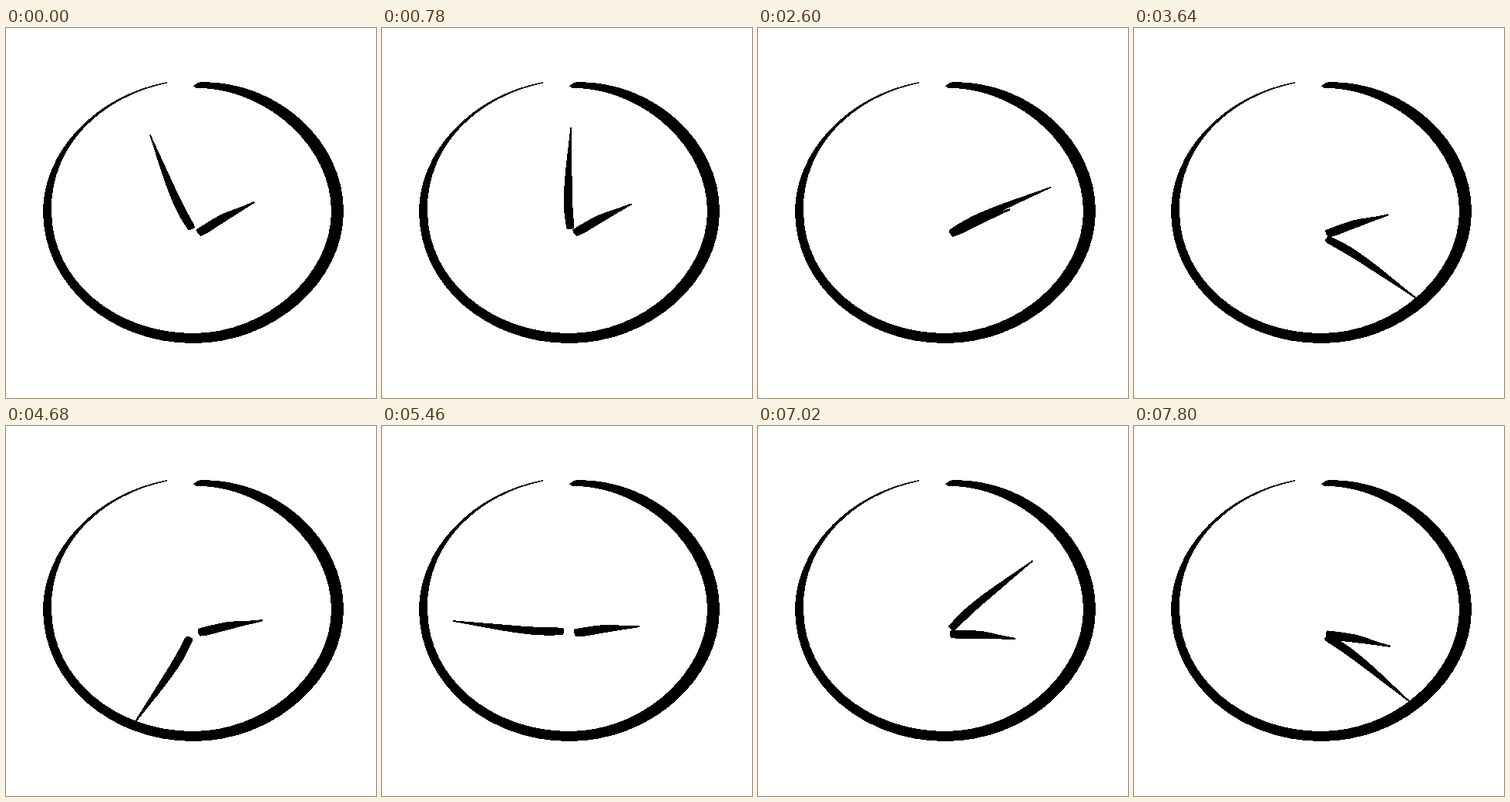
Write an HTML page that moves like this. It is 480 px wide and 480 px high and loops after 8000 ms.

```html
<!DOCTYPE html>
<html>
<head>
<meta charset="utf-8">
<title>Brush clock</title>
<style>
  html, body { margin: 0; width: 100%; height: 100%; overflow: hidden; background: #fff; }
  svg { display: block; width: 100%; height: 100%; }
</style>
</head>
<body>
<svg viewBox="0 0 480 480" shape-rendering="crispEdges">
  <path d="M243 75.5 Q247 70.5 255 70 C354 70 438 147 438 238
    C438 329 348 409 243 409 C135 409 48 333 48 238
    C48 162 114 88 209 70 L209 71.5
    C125 89 57 152 59 238 C59.5 328 143 396 243 396
    C337 396 422 321 422 238 C422 155 342 83 256 78 L246 77.5 Z"/>
  <g transform="translate(243.5 268) scale(1.094 1)">
    <path id="minute" d="M-4 -8 C-6 -20 -8 -35 -7.5 -50 C-7 -80 -4 -100 -.8 -139.3
      L.8 -139.3 C1 -115 1.5 -95 2 -70 C2.2 -42 4 -25 5 -14 Q5.5 -8 3.5 -7.5 L-2 -7 Z"/>
    <path id="hour" d="M-4 -6 C-5 -15 -6 -28 -6 -42 C-5 -55 -2 -65 -1 -83.3
      L1.2 -83.3 C2 -70 3 -55 4 -45 C5 -30 6.5 -20 6.5 -14 L6 -6.5 Q0 -4 -4 -6 Z"/>
  </g>
</svg>
<script>
const LOOP = 8000, STEP = 260;
// [step, minute-hand angle in degrees]: the clock gradually speeds up
const keys = [[0, -21.8], [6, 24.4], [10, 63.8], [14, 126.4], [21, 276.2], [25, 356.4], [30, 490.7]];
const minute = document.getElementById('minute');
const hour = document.getElementById('hour');

function slope(i) {
  const a = keys[Math.max(i - 1, 0)], b = keys[Math.min(i + 1, keys.length - 1)];
  return (b[1] - a[1]) / (b[0] - a[0]);
}

// Cubic Hermite curve through the keys
function angleAt(step) {
  let i = 0;
  while (i < keys.length - 2 && step >= keys[i + 1][0]) i++;
  const [x0, y0] = keys[i], [x1, y1] = keys[i + 1];
  const w = x1 - x0, u = (step - x0) / w, v = 1 - u;
  return v * v * (1 + 2 * u) * y0 + u * u * (1 + 2 * v) * y1
    + w * u * v * (v * slope(i) - u * slope(i + 1));
}

function draw() {
  const step = Math.floor(performance.now() % LOOP / STEP);
  const angle = angleAt(step);
  minute.setAttribute('transform', `rotate(${angle})`);
  hour.setAttribute('transform', `rotate(${61.4 + angle / 12})`);
  requestAnimationFrame(draw);
}
draw();
</script>
</body>
</html>
```
